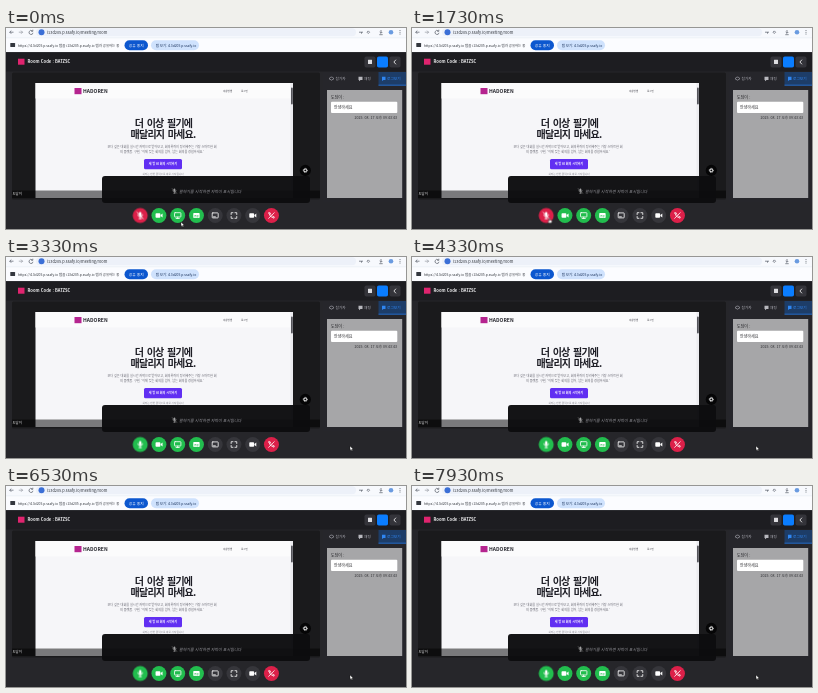
An HTML page that plays this animation: 400x201 px, repeating every 8000 ms.

```html
<!DOCTYPE html>
<html lang="ko">
<head>
<meta charset="utf-8">
<style>
html, body { margin: 0; width: 100%; height: 100%; overflow: hidden; background: #26262a; }
svg { display: block; width: 100vw; height: 100vh; }
text { font-family: "Noto Sans CJK KR", "Noto Sans CJK", "Noto Sans", sans-serif; }
.b { font-weight: 700; }
.mid { text-anchor: middle; }
.end { text-anchor: end; }
.line { fill: none; stroke: #fff; stroke-width: .8; stroke-linecap: round; stroke-linejoin: round; }
.title { font-size: 10px; font-weight: 800; letter-spacing: -.8px; word-spacing: 1.5px; }
</style>
</head>
<body>
<svg viewBox="0 0 400 201" preserveAspectRatio="none">
  <defs>
    <g id="mic">
      <rect x="-1.2" y="-3.5" width="2.4" height="4.4" rx="1.2" fill="#fff"/>
      <path class="line" d="M-2.3-.8a2.3 2.3 0 0 0 4.6 0M0 1.6V3.2M-1.2 3.2H1.2"/>
    </g>
    <g id="micOff"><use href="#mic"/><path class="line" d="M-3-3.2 3 3.2"/></g>
    <g id="cam"><rect x="-3.4" y="-2.3" width="4.8" height="4.6" rx=".8" fill="#fff"/><path d="M1.7-.5 3.6-2V2L1.7.5z" fill="#fff"/></g>
    <g id="screen"><rect class="line" x="-3.2" y="-2.8" width="6.4" height="4.3" rx=".6"/><path class="line" d="M0 1.6V3M-1.6 3H1.6"/></g>
    <g id="caption"><rect x="-3.2" y="-2.6" width="6.4" height="5.2" rx=".8" fill="#fff"/><path d="M-2 .1H0M.8 .1H2M-2 1.4H-.9M0 1.4H2" stroke="#22bd4e" stroke-width=".7"/></g>
    <g id="board"><rect class="line" x="-3" y="-2.6" width="6" height="5" rx=".6"/><path class="line" d="M-1.7 1.3H.2"/></g>
    <g id="full"><path class="line" d="M-2.8-1V-2.8H-1M1-2.8H2.8V-1M2.8 1V2.8H1M-1 2.8H-2.8V1"/></g>
    <g id="leave"><path class="line" d="M-2.8 2.8 2.8-2.8M-2.7-2.5Q-2 1.8 2.5 2.7L2.8 1.4 1.2.7M-2.7-2.5-1.4-2.8-.7-1.2"/></g>
  </defs>

  <!-- browser -->
  <rect width="400" height="10" fill="#f7f9fd"/>
  <rect x="30" y=".3" width="320" height="8" rx="4" fill="#edf1f9"/>
  <g fill="none" stroke="#555b66" stroke-width=".7">
    <path d="M7.5 4.2H3.7M5.3 2.6 3.7 4.2 5.3 5.8"/>
    <path d="M12.8 4.2H16.6M15 2.6 16.6 4.2 15 5.8" opacity=".6"/>
    <path d="M26.4 3A2 2 0 1 0 27 4.8M26.8 1.7V3.3H25.2"/>
    <path d="M353 4.2H357M355.5 4.2V5.7M361 4.2 362.3 2.9 363.6 4.2 362.3 5.5z"/>
    <path d="M375 2V5.2M373.7 4 375 5.3 376.3 4M373.3 6.7H376.7"/>
  </g>
  <circle cx="35.5" cy="4.2" r="3" fill="#3b6fd6"/>
  <circle cx="385" cy="4.3" r="2.3" fill="#6a9be0"/>
  <g fill="#555b66"><circle cx="394" cy="2.5" r=".5"/><circle cx="394" cy="4.3" r=".5"/><circle cx="394" cy="6.1" r=".5"/></g>
  <text x="41" y="5.6" font-size="3.9" fill="#30343b">i13d205.p.ssafy.io/meeting/room</text>

  <rect y="9.6" width="400" height="15" fill="#fbfcff"/>
  <path d="M0 9.8H400" stroke="#e1e6ef" stroke-width=".5"/>
  <rect x="4.3" y="15" width="4.8" height="4" rx=".6" fill="#33373e"/>
  <text x="12" y="18.7" font-size="3.4" fill="#30343b">https://i13d205.p.ssafy.io 탭을 i13d205.p.ssafy.io 탭과 공유하는 중</text>
  <rect x="118.5" y="12.3" width="23.5" height="10" rx="5" fill="#0c57cf"/>
  <text class="mid" x="130.2" y="18.7" font-size="3.8" fill="#fff">공유 중지</text>
  <rect x="145" y="12.3" width="48" height="10" rx="5" fill="#cfe2fd"/>
  <text class="mid" x="170" y="18.6" font-size="3.4" fill="#17305a">탭 보기: i13d205.p.ssafy.io</text>

  <!-- app header -->
  <rect y="24.3" width="400" height="177" fill="#26262a"/>
  <rect y="24.3" width="400" height="19.2" fill="#1d1d21"/>
  <rect x="12" y="30.7" width="6.5" height="6" fill="#e0246f"/>
  <text class="b" x="21.5" y="35.4" font-size="4.2" fill="#f2f2f4">Room Code : BATZSC</text>
  <rect x="358.5" y="28.5" width="11" height="11" rx="1.8" fill="#34343a"/>
  <rect x="371" y="28.5" width="11" height="11" rx="1.8" fill="#0a7dff"/>
  <rect x="383.5" y="28.5" width="11" height="11" rx="1.8" fill="#34343a"/>
  <rect x="362" y="31.7" width="4" height="4.4" rx=".4" fill="#dcdce0"/>
  <path class="line" d="M389.7 32 387.9 34 389.7 36"/>

  <!-- shared screen -->
  <rect x="6" y="44.5" width="308" height="127" rx="1.5" fill="#1a1a1c"/>
  <rect x="29.5" y="55" width="257.5" height="115" fill="#f6f6f9"/>
  <rect x="29.5" y="55" width="257.5" height="15.5" fill="#fbfbfc"/>
  <rect x="284.5" y="55" width="2.5" height="115" fill="#ececf0"/>
  <rect x="285" y="59.5" width="1.8" height="17" rx=".9" fill="#55555b"/>
  <rect x="68.5" y="60" width="7" height="6.2" fill="#b5248f"/>
  <text class="b" x="77" y="65" font-size="5" fill="#25252c">HADOREN</text>
  <g font-size="2.5" fill="#3b3b44"><text x="217" y="64">이용방법</text><text x="235" y="64">로그인</text></g>
  <g class="mid">
    <g class="title" fill="#1c1c24"><text x="157.5" y="99.2">더 이상 필기에</text><text x="157" y="110">매달리지 마세요.</text></g>
    <g font-size="3.1" fill="#666670">
      <text x="156" y="119.8">보다 깊은 대화를 실시간 자막으로 받아보고, 회의록까지 정리해주는 가장 스마트한 회</text>
      <text x="156" y="124.8">의 플랫폼. 구현, '이제 잊는 회의를 넘어, 남는 회의를 경험하세요.'</text>
    </g>
    <rect x="138" y="131" width="38" height="10.2" rx="1.5" fill="#612ff2"/>
    <text class="b" x="157" y="137.3" font-size="3" fill="#fff">새 방 AI 회의 시작하기</text>
    <text x="157" y="146.5" font-size="2.6" fill="#85858e">회의는 한번 클릭으로 바로 시작됩니다</text>
  </g>
  <rect x="6" y="162.5" width="308" height="7.5" fill="#000" fill-opacity=".5"/>
  <text x="6.5" y="167.4" font-size="3.4" fill="#f0f0f2">도담이</text>
  <rect x="96" y="148" width="208" height="27" rx="3" fill="#0d0d0f" fill-opacity=".97"/>
  <use href="#micOff" transform="translate(168.5 163) scale(.7)" opacity=".6"/>
  <text x="173" y="164.6" font-size="4" font-style="italic" fill="#97979d">말하기를 시작하면 자막이 표시됩니다</text>
  <circle cx="299.3" cy="142.4" r="5.6" fill="#050506"/>
  <circle cx="299.3" cy="142.4" r="1.4" fill="none" stroke="#fff" stroke-width="1"/>
  <circle cx="299.3" cy="142.4" r="2.1" fill="none" stroke="#fff" stroke-width=".7" stroke-dasharray=".83 .82"/>

  <!-- sidebar -->
  <rect x="317" y="44" width="83" height="130" fill="#26262b"/>
  <rect x="372.5" y="44" width="27.5" height="13.5" fill="#1d3d68"/>
  <path d="M372.5 57.2H400" stroke="#2680f2" stroke-width=".7"/>
  <g font-size="3.7" fill="#a8a8b0"><text x="329.5" y="52">참가자</text><text x="358" y="52">채팅</text><text x="381" y="52" fill="#2f86f2">로그보기</text></g>
  <path d="M323 50.7Q325.5 47.5 328 50.7Q325.5 53.7 323 50.7" fill="none" stroke="#a8a8b0" stroke-width=".7"/>
  <path d="M352.5 48.7H356.5V52H354.5L353 53.2V52H352.5z" fill="#b8b8be"/>
  <path d="M376 48.7H379.5V52H377.5L376 53z" fill="#2f86f2"/>
  <rect x="321" y="62" width="75.2" height="108" fill="#a6a6a8"/>
  <text x="325" y="70.8" font-size="4" fill="#202024">도담이 :</text>
  <rect x="325" y="73.8" width="66.3" height="11.2" rx="1" fill="#fff"/>
  <text x="328" y="80.9" font-size="4" fill="#202024">안녕하세요</text>
  <text class="end" x="391" y="90.6" font-size="3.6" font-weight="500" fill="#2c2c30">2025. 08. 17 오후 09:43:43</text>

  <g id="bar"></g>
  <g id="cursor">
    <path id="arrow" d="M0 0V4.4L1.1 3.4 1.9 5.1 2.6 4.8 1.9 3.2H3.3z" fill="#fff" stroke="#111" stroke-width=".4"/>
    <path id="hand" d="M-.5 0Q0-.5 .5 0V1.7L2.2 2Q2.6 2.2 2.4 3.2L1.9 4.5H-.5L-1.7 2.9Q-1.4 2.2-.5 2.8z" fill="#fff" stroke="#111" stroke-width=".4"/>
  </g>
</svg>
<script>
const LOOP = 8000, RED = '#dc2049', GREEN = '#22bd4e', DARK = '#36363b';
const MIC_ON = 1900, HOVER = [450, 2080];
const $ = id => document.getElementById(id);

const buttons = [
  ['micOff', RED, 'muted'], ['cam', GREEN], ['screen', GREEN], ['caption', GREEN],
  ['board', DARK], ['full', DARK], ['cam', DARK], ['leave', RED]
];
const button = ([icon, color, id = ''], i) =>
  `<g id="${id}" transform="translate(${134.2 + i * 18.75} 187.5)">
    <circle r="7.5" fill="${color}"/><use href="#${icon}"/></g>`;
$('bar').innerHTML = buttons.map(button).join('') + button(['mic', GREEN, 'live'], 0);

// time, x, y of the pointer tip
const path = [
  [0, 175, 194], [130, 175, 194], [400, 163, 193], [670, 149.5, 191.5],
  [1100, 149.5, 191.5], [1550, 137.5, 190.5], [1950, 137.5, 190.5],
  [2200, 190, 197], [2450, 261, 197], [2670, 261, 197],
  [2930, 344, 189], [LOOP, 344, 189]
];
const play = (el, frames) => el.animate(frames, { duration: LOOP, iterations: Infinity });

// Visible from `first` on the loop, flipping at each given time
const flip = (id, first, ...times) => {
  const steps = [0, ...times].map((t, i) => ({
    opacity: i % 2 ? 1 - first : first, offset: t / LOOP, easing: 'step-end'
  }));
  play($(id), [...steps, { opacity: steps.at(-1).opacity, offset: 1 }]);
};

play($('cursor'), path.map(([t, x, y]) => ({
  offset: t / LOOP, transform: `translate(${x}px, ${y}px)`, easing: 'ease-in-out'
})));
flip('muted', 1, MIC_ON);
flip('live', 0, MIC_ON);
flip('hand', 0, ...HOVER);
flip('arrow', 1, ...HOVER);
</script>
</body>
</html>
```
